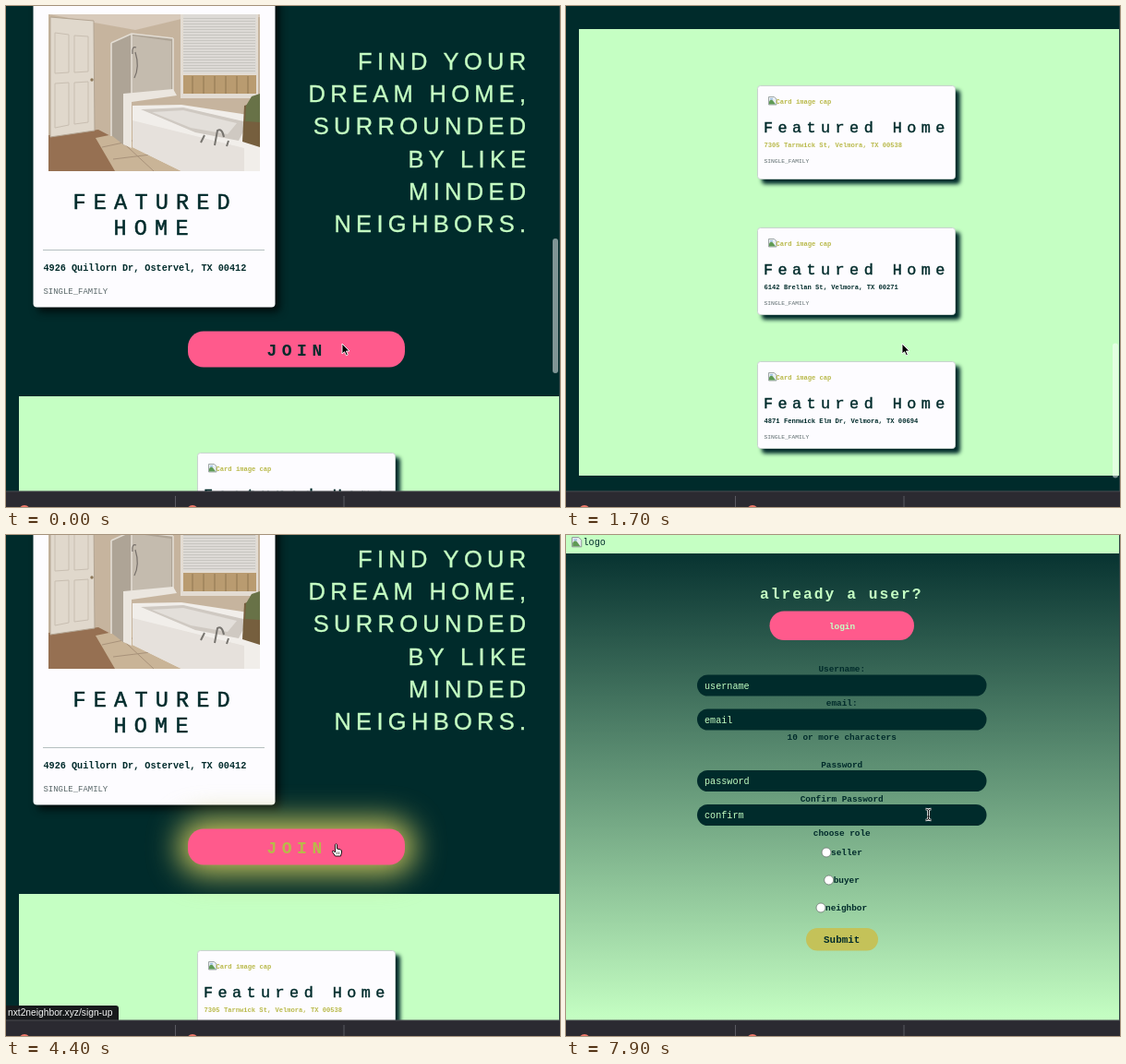
An HTML page for the animation above (8000 ms loop, 600 by 543 pixels).

```html
<!DOCTYPE html>
<html lang="en">
<head>
<meta charset="utf-8">
<title>Neighbor homes</title>
<style>
html, body { margin: 0; width: 100%; height: 100%; overflow: hidden; background: #002b2b; }
svg { display: block; width: 600px; height: 543px; }
text { font-family: 'Liberation Mono', monospace; white-space: pre; }
.sans { font-family: 'Liberation Sans', Arial, sans-serif; }
.b { font-weight: bold; }
.soft { filter: drop-shadow(5px 5px 2px #002b2a); }
.deep { filter: drop-shadow(5px 5px 4px #000c0c); }
.glow { filter: blur(16px); }
</style>
</head>
<body>
<svg id="stage" viewBox="0 0 600 543"></svg>
<script>
const DARK = '#002b2b', MINT = '#c5ffc3', PINK = '#ff5a8c', OLIVE = '#b9b94a', PAPER = '#fdfcff', GREY = '#5a686a';

const rect = (x, y, w, h, fill, extra = '') =>
  `<rect x="${x}" y="${y}" width="${w}" height="${h}" fill="${fill}" ${extra}/>`;
const poly = (points, fill, extra = '') => `<polygon points="${points}" fill="${fill}" ${extra}/>`;
const path = (d, fill, extra = '') => `<path d="${d}" fill="${fill}" ${extra}/>`;
const text = (x, y, str, size, fill, extra = '') =>
  `<text x="${x}" y="${y}" font-size="${size}" fill="${fill}" ${extra}>${str}</text>`;
const spaced = n => `letter-spacing="${n}"`;
const heavier = (color, width) => `stroke="${color}" stroke-width="${width}"`;
const mid = 'text-anchor="middle" class="b"';

const brokenImage = (x, y, s = 1) => `<g transform="translate(${x} ${y}) scale(${s})">` +
  path('M.5 .5H6.5L9 3V9H.5Z', '#e9eef2', 'stroke="#8a9294" stroke-width=".8"') +
  path('M1 5.5Q3 2 5 4.5L8 8.5H1Z', '#5f9a55') + rect(2, 2, 3, 1.5, '#9fc0e4') + '</g>';

function photo() {
  let blinds = '';
  for (let y = 13; y < 72; y += 3) blinds += rect(192, y, 78, .7, '#bfbcb8');
  return '<svg x="46" y="9" width="229" height="170" viewBox="46 9 229 170">' +
    rect(46, 9, 229, 170, '#c6b49e') +
    poly('46,9 275,9 275,12 190,14 140,26 46,9', '#d8cabb') +
    poly('46,140 100,134 150,160 175,179 46,179', '#967052') +
    poly('97,143 136,135 190,179 118,179', '#c9b497') +
    path('M104 153L146 144M116 166L165 160M118 140L160 179', 'none', 'stroke="#a8927a" stroke-width="1"') +
    poly('48,12 95,16 96,135 48,142', '#e0d8cc', 'stroke="#b3a593" stroke-width="1"') +
    path('M53 29L68 31V72L53 73ZM74 32L89 33V71L74 72ZM53 84L68 83V129L53 132ZM74 83L89 82V126L74 128Z',
      'none', 'stroke="#c8beb1" stroke-width="1"') +
    '<circle cx="93" cy="80" r="1.7" fill="#8b7758"/>' +
    poly('114,40 136,30 181,35 181,95 128,95 128,151 114,140', '#aea496') +
    poly('136,32 179,38 179,92 136,95', '#c4bbae') +
    path('M114 40L136 30L181 35M114 40V141M136 30V95M181 35V94', 'none', 'stroke="#e3ddd4" stroke-width="1.6"') +
    path('M141 45Q136 43 137 52M140 50Q145 66 139 78', 'none', 'stroke="#77706a" stroke-width="1.2"') +
    rect(189, 9, 84, 91, '#e3dcd3') + rect(192, 9, 79, 64, '#dddad6') + blinds +
    rect(192, 75, 79, 20, '#b99b70') +
    path('M202 76V95M214 76V95M226 76V95M238 76V95M250 76V95M262 76V95', 'none', 'stroke="#8f7650" stroke-width="1"') +
    poly('127,95 181,90 185,97 136,104 136,154 127,150', '#ebe6df') +
    poly('137,108 190,107 275,120 275,179 190,179 137,153', '#f1eeea') +
    poly('137,124 258,154 258,179 190,179 137,153', '#e6e1dc') +
    poly('146,112 192,110 262,126 252,146 205,137', '#cfc9c2') +
    poly('158,115 192,113 250,127 240,139 200,132', '#e3dfda') +
    path('M226 151L229 135Q234 132 236 142M211 148L215 140M239 152L241 146', 'none', 'stroke="#77746f" stroke-width="2"') +
    poly('258,108 275,103 275,153 256,147', '#765f3e') +
    poly('260,108 266,98 275,95 275,126 259,125', '#687247') + '</svg>';
}

function listing(y, h, address, color) {
  return rect(207.5, y + .5, 214, h, PAPER, 'rx="3" stroke="#c9d3cf" class="soft"') +
    brokenImage(219, y + 12) +
    text(227.5, y + 19.5, 'Card image cap', 7.13, OLIVE, 'class="b"') +
    text(214, y + 51, 'Featured Home', 16.8, DARK, `${spaced(5.45)} ${heavier(DARK, .4)}`) +
    text(214.5, y + 66.5, address, 7.13, color, 'class="b"') +
    text(214.5, y + 84, 'SINGLE_FAMILY', 6.25, GREY);
}

function homePage() {
  const slogan = ['FIND YOUR', 'DREAM HOME,', 'SURROUNDED', 'BY LIKE', 'MINDED', 'NEIGHBORS.'];
  const heading = `${spaced(8.2)} ${heavier(DARK, .5)}`;
  return rect(0, 0, 600, 930, DARK) +
    rect(29.5, -60, 262, 386.5, PAPER, 'rx="4" class="deep"') + photo() +
    text(72.5, 219.5, 'FEATURED', 23.5, DARK, heading) +
    text(116.5, 247.5, 'HOME', 23.5, DARK, heading) +
    rect(40, 264, 240, 1, '#b5c0c0') +
    text(40.5, 286.5, '4926 Quillorn Dr, Ostervel, TX 00412', 10.18, DARK, 'class="b"') +
    text(40.5, 311.5, 'SINGLE_FAMILY', 8.95, GREY) +
    slogan.map((line, i) => text(568.5, 69 + i * 35.2, line, 25.5, MINT,
      `class="sans" text-anchor="end" ${spaced(5.3)} ${heavier(MINT, .35)}`)).join('') +
    rect(14, 423, 585, 484, MINT) +
    rect(187, 342.5, 255, 59, '#c5c35c', 'id="glow" rx="27" class="glow"') +
    rect(197, 352.5, 235, 39, PINK, 'rx="17"') +
    text(282.5, 379, 'JOIN', 18, DARK, `id="join" class="b" ${spaced(5.5)}`) +
    listing(484, 101, '7305 Tarnwick St, Velmora, TX 00538', OLIVE) +
    listing(638, 94, '6142 Brellan St, Velmora, TX 00271', DARK) +
    listing(783, 94, '4871 Fennwick Elm Dr, Velmora, TX 00694', DARK);
}

function signUpPage() {
  const label = (y, str) => text(298.7, y, str, 9.4, DARK, mid);
  const field = (y, str) => rect(142, y, 313.5, 23, DARK, 'rx="11.5"') + text(150, y + 15, str, 10.15, MINT);
  const radio = (x, y, str) =>
    `<circle cx="${x}" cy="${y}" r="5" fill="#fff" stroke="#6d7672" stroke-width=".8"/>` +
    text(x + 5, y + 3.3, str, 9.4, DARK, 'class="b"');
  return `<linearGradient id="fade" x2="0" y2="526" gradientUnits="userSpaceOnUse">
      <stop stop-color="${DARK}"/><stop offset="1" stop-color="${MINT}"/></linearGradient>` +
    rect(0, 0, 600, 526, 'url(#fade)') + rect(0, 0, 600, 20, MINT) +
    brokenImage(6, 2, 1.2) + text(18.5, 11, 'logo', 10.15, DARK) +
    text(210, 69, 'already a user?', 16.3, MINT, `class="b" ${spaced(2)}`) +
    rect(220.5, 82.5, 156.5, 31.5, PINK, 'rx="15.7"') + text(299, 102, 'login', 9.4, MINT, mid) +
    label(148, 'Username:') + field(151.5, 'username') +
    label(185, 'email:') + field(188.5, 'email') +
    label(222, '10 or more characters') +
    label(251.5, 'Password') + field(255, 'password') +
    label(288.5, 'Confirm Password') + field(292, 'confirm') +
    label(325.5, 'choose role') +
    radio(282, 344, 'seller') + radio(284.7, 374, 'buyer') + radio(276, 404, 'neighbor') +
    rect(260, 426, 78, 24.5, '#c4c259', 'rx="12.2"') + text(298.7, 442, 'Submit', 10.9, DARK, mid);
}

const cursors = {
  arrow: path('M0 0V11L2.6 8.7L4.5 12.8L6.3 12L4.5 8H8Z', '#000', 'stroke="#fff" stroke-width=".9"'),
  hand: path('M-1 .5Q0-1 1 .5V5L5 6Q6.5 6.5 6 9L5 13H-1L-4 8.5Q-4 6.5-2.5 7.5L-1 9Z', '#fff',
    'stroke="#000" stroke-width=".9"') + path('M1 8.5V11M3 8.5V11', 'none', 'stroke="#000" stroke-width=".6"'),
  beam: ['#fff" stroke-width="2.6', '#000" stroke-width=".9'].map(s =>
    path('M-3-6Q0-6 0-4Q0-6 3-6M0-5V5M-3 6Q0 6 0 4Q0 6 3 6M-1.5 2H1.5', 'none', `stroke="${s}"`)).join('')
};

const stage = document.getElementById('stage');
stage.innerHTML = `<g id="home">${homePage()}</g><g id="signUp">${signUpPage()}</g>` +
  rect(592, 252, 6, 146, '#fff', 'id="thumb" rx="3"') +
  rect(599, 0, 1, 526, '#2c4342') +
  '<g id="link">' + path('M0 510H119Q122 510 122 513V526H0Z', '#17191b') +
  text(2, 521, 'nxt2neighbor.xyz/sign-up', 10.25, '#f4f5f5', 'class="sans"') + '</g>' +
  rect(0, 526, 600, 17, '#2b2a31') + rect(0, 525.5, 600, 1, '#4a4a50') +
  [183, 365.5].map(x => rect(x, 531, 1, 12, '#5b5a62')).join('') +
  [20, 202].map(x => `<circle cx="${x}" cy="547.5" r="6.5" fill="#ee7768"/>`).join('') +
  Object.keys(cursors).map(k => `<g id="${k}">${cursors[k]}</g>`).join('');

const el = id => document.getElementById(id);
const show = (id, on) => el(id).setAttribute('opacity', +on);
const move = (id, x, y) => el(id).setAttribute('transform', `translate(${x} ${y})`);
const ramp = (t, a, b) => Math.min(1, Math.max(0, (t - a) / (b - a)));

// Piecewise linear value from [time, value] pairs
function along(keys, t) {
  let v = keys[0][1];
  for (let i = 1; i < keys.length; i++)
    v += (keys[i][1] - keys[i - 1][1]) * ramp(t, keys[i - 1][0], keys[i][0]);
  return v;
}

const scrollKeys = [[0, 0], [600, 229], [900, 330], [1200, 385], [1400, 398], [1800, 398],
  [2200, 220], [2500, 80], [2700, 34]];
const xKeys = [[2700, 364], [3000, 357.5], [6500, 357.5], [7300, 392.5]];
const yKeys = [[2700, 366], [3000, 335], [6500, 335], [7300, 303]];

function draw(now) {
  const t = Math.floor(now % 8000 / 100) * 100;   // ten steps a second
  const scroll = along(scrollKeys, t), x = along(xKeys, t), y = along(yKeys, t);
  const joined = t >= 4900, hover = t > 2700 && !joined && y < 358;

  move('home', 0, -scroll);
  show('signUp', joined);
  show('glow', joined ? 0 : ramp(t, 2700, 3100));
  el('join').setAttribute('fill', hover ? OLIVE : DARK);
  show('link', hover);
  el('thumb').setAttribute('y', 252 + scroll * .285);
  show('thumb', .5 * (1 - ramp(t, 2800, 3100)));

  const kind = hover || (joined && t <= 6500) ? 'hand' : joined && y < 315 ? 'beam' : 'arrow';
  for (const k in cursors) show(k, k === kind);
  move(kind, x, y);
  requestAnimationFrame(draw);
}
requestAnimationFrame(draw);
</script>
</body>
</html>
```
